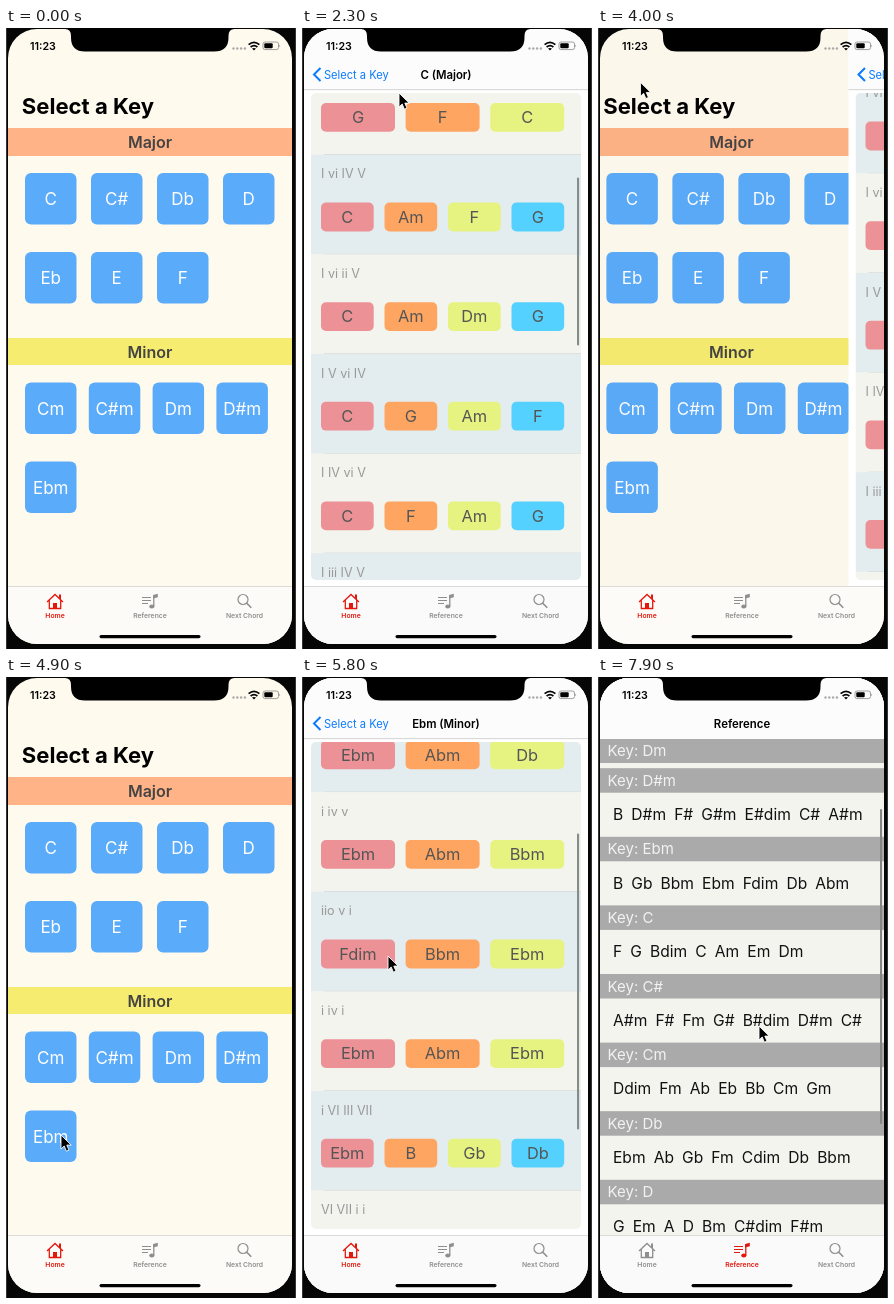
Write an HTML page that moves like this. It is 290x621 px and loops after 8000 ms.

```html
<!DOCTYPE html>
<html lang="en">
<head>
<meta charset="utf-8">
<title>Chord keys</title>
<style>
  html, body { margin: 0; width: 100%; height: 100%; overflow: hidden; background: #000; }
  svg { display: block; font-family: Inter, "Open Sans", sans-serif; cursor: default; }
</style>
</head>
<body>
<svg id="stage" width="290" height="621" viewBox="0 0 290 621">
  <defs>
    <clipPath id="screen"><rect x="2" y="1" width="284" height="615" rx="29"/></clipPath>
    <clipPath id="list"><rect x="9" y="65" width="270" height="487" rx="5"/></clipPath>
    <clipPath id="body"><rect x="2" y="62" width="284" height="498"/></clipPath>
  </defs>
  <rect width="290" height="621" fill="#060606"/>
  <path d="M.5 0V621M289.5 0V621" stroke="#333"/>
  <g clip-path="url(#screen)">
    <g id="pages"></g>
    <g id="tabs"></g>
    <g id="status">
      <text x="24" y="22" font-size="10.7" font-weight="600">11:23</text>
      <g fill="#aaa"><circle cx="227.5" cy="20.5" r="1.2"/><circle cx="231.3" cy="20.5" r="1.2"/><circle cx="235.1" cy="20.5" r="1.2"/><circle cx="238.9" cy="20.5" r="1.2"/></g>
      <g fill="none" stroke="#000" stroke-width="1.7"><path d="M242.6 16.6q5.4-4.6 10.8 0M244.6 19q3.4-2.8 6.8 0"/></g>
      <path d="M246 20.6q2-1.4 4 0l-2 2z"/>
      <rect x="257" y="14" width="15.5" height="7.6" rx="2" fill="none" stroke="#888" stroke-width=".8"/>
      <rect x="258.3" y="15.3" width="8.4" height="5" rx="1"/>
      <path d="M273.4 16.4q1.6 1.4 0 2.8z" fill="#888"/>
    </g>
  </g>
  <path d="M59 0V1Q65 1 65 8V9.500Q65 23.500 79 23.500H208Q222.500 23.500 222.500 9.500V8Q222.500 1 228.500 1V0Z"/>
  <rect x="93.500" y="607" width="101" height="3.200" rx="1.600"/>
  <path id="cursor" d="M0 0V14L3.200 11L5.400 16.200L8 15.100L5.800 10.100H10.200Z" stroke="#fff" stroke-width=".9"/>
</svg>
<script>
const $ = id => document.getElementById(id);

function add(parent, tag, attrs = {}, text) {
  const el = document.createElementNS('http://www.w3.org/2000/svg', tag);
  for (const k in attrs) el.setAttribute(k, attrs[k]);
  if (text !== undefined) el.textContent = text;
  parent.appendChild(el);
  return el;
}
const box = (p, x, y, width, height, fill, rx = 0) => add(p, 'rect', { x, y, width, height, fill, rx });
const label = (p, text, x, y, size, fill, more) =>
  add(p, 'text', { x, y, 'font-size': size, fill, ...more }, text);
const MID = { 'text-anchor': 'middle' };
const BOLD = { ...MID, 'font-weight': 600 };
const pages = $('pages');

// Key picker
const home = add(pages, 'g');
box(home, 0, 0, 290, 621, '#fffaee');
label(home, 'Select a Key', 15.8, 86, 22.1, '#000', { 'font-weight': 700 });
function keyGroup(title, y, h, color, top, step, names) {
  box(home, 2, y, 284, h, color);
  label(home, title, 144, y + 20, 16, '#444', BOLD);
  names.split(' ').forEach((name, i) => {
    const x = 19 + (i % 4) * step, by = top + Math.floor(i / 4) * 79;
    box(home, x, by, 51.5, 51.5, '#5aabfa', 6);
    label(home, name, x + 25.7, by + 32, 17, '#fff', MID);
  });
}
keyGroup('Major', 100, 28, '#ffb387', 145, 66, 'C C# Db D Eb E F');
keyGroup('Minor', 310, 27, '#f6ec70', 354.5, 63.8, 'Cm C#m Dm D#m Ebm');
const dim = box(home, 0, 0, 290, 621, '#000');

// Progression lists
const ROW = 99.6;
const CHIPS = ['#ec9195', '#ffa562', '#e6f381', '#55d1ff'];

function detail(title, thumb, rate, rows) {
  const page = add(pages, 'g');
  box(page, 2, 0, 284, 621, '#fff');
  box(page, 2, 0, 284, 62, '#fcfcfc');
  box(page, 2, 61.4, 284, .7, '#c4c4c4');
  add(page, 'path', { d: 'M18.500 40L12 46.500L18.500 53', fill: 'none', stroke: '#0a7aff', 'stroke-width': 2 });
  label(page, 'Select a Key', 22, 50.5, 11.1, '#0a7aff');
  label(page, title, 144, 50.5, 11.4, '#000', BOLD);

  const list = add(add(page, 'g', { 'clip-path': 'url(#list)' }), 'g');
  rows.forEach(([numerals, names], i) => {
    const y = 65 + i * ROW, chords = names.split(' ');
    const four = chords.length > 3, w = four ? 52.7 : 74, step = four ? 63.5 : 84.6;
    box(list, 9, y, 270, ROW + .2, i % 2 ? '#e3ecee' : '#f3f4ee');
    box(list, 22, y + ROW - .5, 257, .7, '#ccd1d0');
    label(list, numerals, 19, y + 23.5, 12.6, '#999');
    chords.forEach((name, k) => {
      const x = 19 + k * step;
      box(list, x, y + 47.8, w, 28.8, CHIPS[k], 5);
      label(list, name, x + w / 2, y + 68, 16.4, '#555', MID);
    });
  });
  const bar = box(page, 275, 65.8, 2.1, thumb, '#868b8c', 1);
  return (shown, offset) => {
    page.setAttribute('visibility', shown > 0 ? 'visible' : 'hidden');
    page.setAttribute('transform', `translate(${284 * (1 - shown)} 0)`);
    list.setAttribute('transform', `translate(0 ${-offset})`);
    bar.setAttribute('y', 65.8 + offset * rate);
    bar.setAttribute('opacity', offset > 0 ? 1 : 0);
  };
}
const showMajor = detail('C (Major)', 168, .353, [
  ['I IV V', 'C F G'], ['ii V I', 'Dm G C'], ['V IV I', 'G F C'],
  ['I vi IV V', 'C Am F G'], ['I vi ii V', 'C Am Dm G'], ['I V vi IV', 'C G Am F'],
  ['I IV vi V', 'C F Am G'], ['I iii IV V', 'C Em F G'], ['I IV I V', 'C F C G'],
]);
const showMinor = detail('Ebm (Minor)', 296, .608, [
  ['i VI VII', 'Ebm B Db'], ['i iv VII', 'Ebm Abm Db'], ['i iv v', 'Ebm Abm Bbm'],
  ['iio v i', 'Fdim Bbm Ebm'], ['i iv i', 'Ebm Abm Ebm'], ['i VI III VII', 'Ebm B Gb Db'],
  ['VI VII i i', 'B Db Ebm Ebm'], ['i VII VI VII', 'Ebm Db B Db'],
]);

// Reference
const SECTION = 68.6, HEAD = 24.5;
const ref = add(pages, 'g');
box(ref, 2, 0, 284, 621, '#f3f4ee');
box(ref, 2, 0, 284, 62, '#fcfcfc');
label(ref, 'Reference', 144, 50.5, 11.4, '#000', BOLD);
const refBody = add(ref, 'g', { 'clip-path': 'url(#body)' });
const refRows = add(refBody, 'g');
const heads = [
  ['E', 'A B D#dim E C#m G#m F#m'], ['Dm', 'Bb Gm Edim F Am C Dm'],
  ['D#m', 'B D#m F# G#m E#dim C# A#m'], ['Ebm', 'B Gb Bbm Ebm Fdim Db Abm'],
  ['C', 'F G Bdim C Am Em Dm'], ['C#', 'A#m F# Fm G# B#dim D#m C#'],
  ['Cm', 'Ddim Fm Ab Eb Bb Cm Gm'], ['Db', 'Ebm Ab Gb Fm Cdim Db Bbm'],
  ['D', 'G Em A D Bm C#dim F#m'],
].map(([key, chords], i) => {
  label(refRows, chords, 15, 62 + i * SECTION + 51.8, 15.6, '#111', { 'word-spacing': 3.7 });
  const head = add(refBody, 'g');
  box(head, 2, 0, 284, HEAD, '#aaa');
  label(head, 'Key: ' + key, 9.6, 17.5, 15, '#f2f2f2');
  return head;
});
const refBar = box(ref, 282, 62, 2.1, 315, '#868686', 1);

function showRef(shown, offset) {
  ref.setAttribute('visibility', shown ? 'visible' : 'hidden');
  refRows.setAttribute('transform', `translate(0 ${-offset})`);
  heads.forEach((head, i) => {
    const top = 62 + i * SECTION - offset;
    const y = Math.max(top, Math.min(61.5, top + SECTION - HEAD));
    head.setAttribute('transform', `translate(0 ${y})`);
  });
  refBar.setAttribute('y', 62 + offset * .648);
  refBar.setAttribute('opacity', offset > 0 ? 1 : 0);
}

// Tab bar
const tabs = $('tabs');
const tabBg = box(tabs, 2, 558, 284, 60, '#fafafa');
box(tabs, 2, 558, 284, .7, '#cfcdc9');
function tab(x, name, draw) {
  const g = add(tabs, 'g');
  label(g, name, x, 589.6, 6.8, 'currentColor', BOLD);
  draw(g);
  return on => g.setAttribute('color', on ? '#e3170d' : '#8e8e8e');
}
const line = (g, d, w) =>
  add(g, 'path', { d, fill: 'none', stroke: 'currentColor', 'stroke-width': w });
const solid = (g, d) => add(g, 'path', { d, fill: 'currentColor' });
const homeTab = tab(49, 'Home', g => {
  line(g, 'M41 574L49 566.500L57 574M43.300 572.500V580.500H54.700V572.500', 1.3);
  solid(g, 'M47 581V575H51V581ZM53 570V566.500H55V572Z');
});
const refTab = tab(144, 'Reference', g => {
  line(g, 'M136 569.500H145M136 572.500H145M136 575.500H142', 1.1);
  line(g, 'M147.800 578.500V567', 1.3);
  solid(g, 'M147.200 567L151.800 565.800V569.300L147.200 570.500Z');
  add(g, 'ellipse', { cx: 145.8, cy: 578.5, rx: 2.6, ry: 2.1, fill: 'currentColor' });
});
tab(238.5, 'Next Chord', g => {
  add(g, 'circle', { cx: 237, cy: 571.5, r: 5, fill: 'none', stroke: 'currentColor', 'stroke-width': 1.2 });
  line(g, 'M240.600 575.100L245.300 579.800', 1.5);
})(false);

// Each step: time, values..., easing into that step
const smooth = p => p * p * (3 - 2 * p);
const linear = p => p;
const out = p => 1 - (1 - p) ** 3;
const PATH = [
  [100, [270, 600]], [800, [47, 172]], [1300, [47, 172]], [1800, [95, 302]],
  [2300, [97, 65], linear], [2700, [97, 62]], [3600, [42, 40]], [3900, [42, 40]],
  [4800, [55, 458]], [5300, [55, 458]], [5500, [80, 428]], [5800, [86, 279], linear],
  [6300, [86, 279]], [6800, [147, 570]], [7000, [147, 570]], [7200, [150, 521]],
  [7400, [160, 457]], [7500, [160, 457]], [7900, [161, 349], linear],
];
const MAJOR_IN = [[950, [0]], [1450, [1], out], [3750, [1]], [4250, [0], out]];
const MINOR_IN = [[4950, [0]], [5450, [1], out]];
const MAJOR_SCROLL = [[1800, [0]], [2300, [237], linear], [2700, [318], out]];
const MINOR_SCROLL = [[5500, [0]], [5800, [149], linear], [6300, [197.5], out]];
const REF_SCROLL = [[7500, [0]], [7900, [108], linear]];

function at(steps, t) {
  const i = steps.findIndex(s => s[0] > t);
  if (i === 0) return steps[0][1];
  if (i < 0) return steps[steps.length - 1][1];
  const [t0, a] = steps[i - 1], [t1, b, ease = smooth] = steps[i];
  const p = ease((t - t0) / (t1 - t0));
  return a.map((v, k) => v + (b[k] - v) * p);
}

function draw(t) {
  const [major] = at(MAJOR_IN, t), [minor] = at(MINOR_IN, t);
  const pushed = Math.max(major, minor), onRef = t >= 7000;
  home.setAttribute('transform', `translate(${-85 * pushed} 0)`);
  dim.setAttribute('opacity', pushed * .1);
  showMajor(major, at(MAJOR_SCROLL, t)[0]);
  showMinor(minor, at(MINOR_SCROLL, t)[0]);
  showRef(onRef, at(REF_SCROLL, t)[0]);
  homeTab(!onRef);
  refTab(onRef);
  tabBg.setAttribute('fill', pushed > .5 ? '#fafafa' : '#fdfbf7');
  const [x, y] = at(PATH, t);
  $('cursor').setAttribute('transform', `translate(${x} ${y})`);
  $('cursor').setAttribute('visibility', t < 100 ? 'hidden' : 'visible');
}

const start = performance.now();
function tick() {
  const t = (performance.now() - start) % 8000;
  draw(Math.floor(t / 100) * 100);
  requestAnimationFrame(tick);
}
tick();
</script>
</body>
</html>
```
